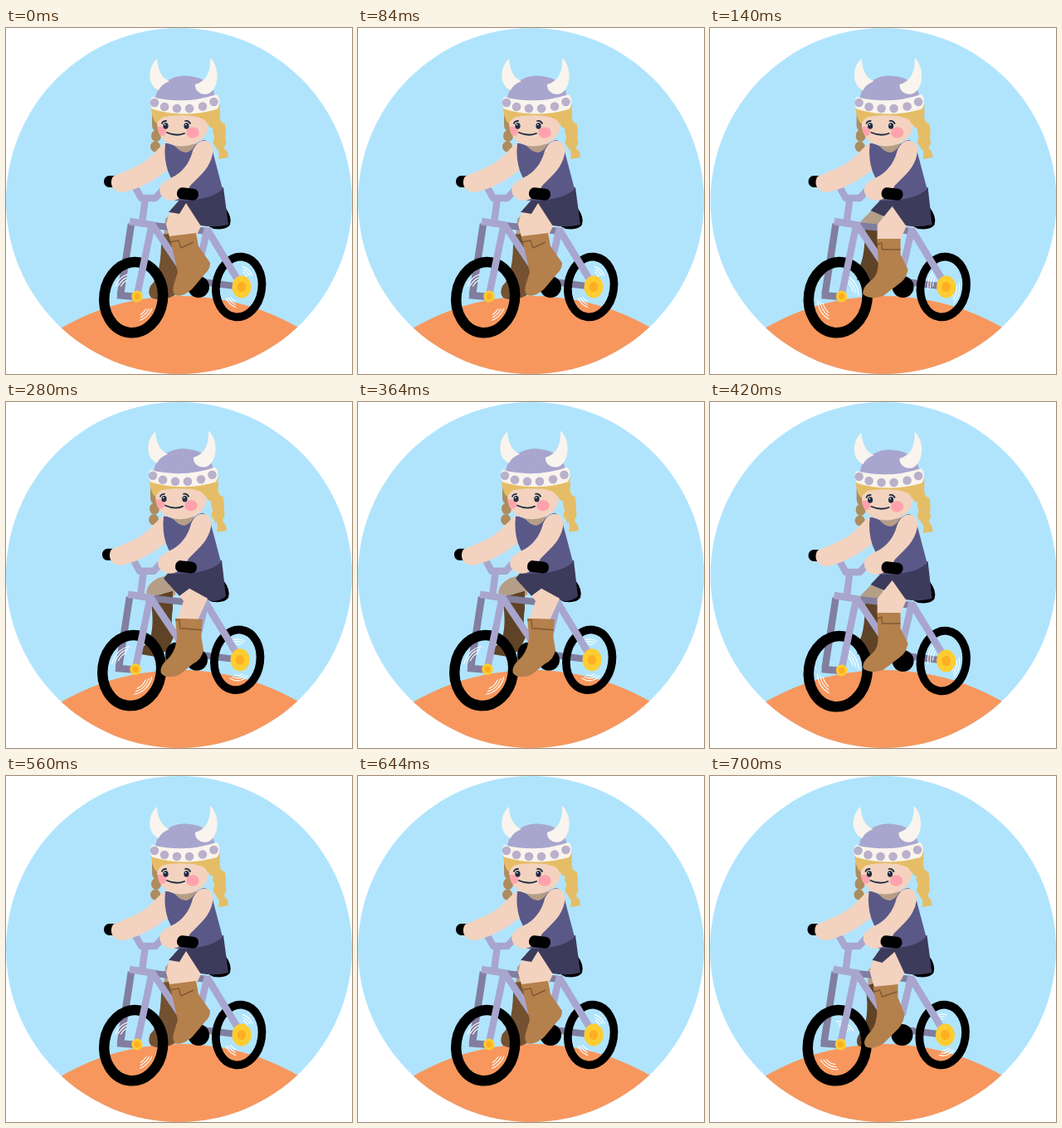
Animation, 417 px wide and 417 px high, one loop 0.84 s. Source, as an HTML page:

```html
<!DOCTYPE html>
<html lang="en">
<head>
<meta charset="utf-8">
<title>Viking cyclist</title>
<style>
html, body { margin: 0; width: 100%; height: 100%; overflow: hidden; background: #fff }
svg { display: block; width: 100vw; height: 100vh }
.skin { fill: #f3d3bf } .shade { fill: #b59e88 }
.boot { fill: #b4804c } .far { fill: #745130 } .deep { fill: #5f4327 }
.tunic { fill: #5a5887 } .shorts { fill: #3d3b5b }
.cream { fill: #f9f4ed } .metal { fill: #a8a6ce } .hair { fill: #e5bd66 } .darkhair { fill: #ad8c5d }
.gold { fill: #ffcc31 } .amber { fill: #fdae22 } .pink { fill: #ffa2ad }
.tube { fill: none; stroke: #a8a6ce; stroke-width: 8.5; stroke-linejoin: round }
.dim { stroke: #817e9f }
.tyre { fill: none; stroke: #000 }
.shine path { fill: none; stroke: #fff; stroke-width: 1.1; stroke-linecap: round }
.ink { fill: none; stroke: #1d2d42; stroke-width: 1.8; stroke-linecap: round }
.fold { fill: none; stroke: #805932; stroke-width: 1.4 }
</style>
</head>
<body>
<svg viewBox="0 0 417 417">
  <clipPath id="disc"><circle id="edge" cx="208.5" cy="208.5" r="208.5"/></clipPath>
  <g clip-path="url(#disc)">
    <rect width="417" height="417" fill="#b0e4fd"/>
    <circle cx="210" cy="609" r="286" fill="#f7975d"/>
  </g>
  <g id="rider">
    <g id="farLeg"></g>
    <g class="tube">
      <path class="dim" d="M151 236L138 321"/>
      <path class="dim" d="M134 322L158 324"/>
      <path class="dim" d="M178 238L243 245M228 305L284 312" stroke-width="8"/>
    </g>
    <ellipse class="tyre" cx="280.7" cy="312" rx="27.6" ry="36.5" stroke-width="9.7" transform="rotate(8 280.7 312)"/>
    <ellipse class="tyre" cx="153.7" cy="324.7" rx="35.3" ry="42.7" stroke-width="12.5" transform="rotate(8 153.7 324.7)"/>
    <g id="shine" class="shine"></g>
    <ellipse cx="232" cy="312" rx="13" ry="13"/>
    <path d="M241 237L264 216Q273 228 270 237Q266 244 250 242Z"/>
    <g class="tube">
      <path d="M153 187L163 205H180L190 194M168 204L164 235"/>
      <path d="M149 233L180 238M176 236L158 322"/>
      <path d="M177 238L212 290M243 241L232 288M242 242L281 306"/>
    </g>
    <ellipse class="gold" cx="284" cy="312" rx="11.5" ry="13.5"/>
    <ellipse class="amber" cx="284" cy="312" rx="5.2" ry="6"/>
    <ellipse class="gold" cx="158" cy="323.5" rx="6.7" ry="7"/>
    <ellipse class="amber" cx="158" cy="323.5" rx="3.6" ry="3.8"/>
    <g id="nearLeg"></g>

    <g class="darkhair">
      <path d="M176 104L189 109L186 124Q176 126 176 117Z"/>
      <ellipse cx="181" cy="130" rx="6" ry="7"/><ellipse cx="180" cy="143" rx="6" ry="6.5"/>
    </g>
    <rect x="118" y="178" width="18" height="14" rx="6.5"/>
    <path class="skin" d="M193 137C181 146 174 158 162 164C149 171 136 176 129 179C124 187 128 198 141 198C158 195 179 184 196 170Z"/>
    <path class="tunic" d="M192 139Q200 138 207 145Q217 151 226 143Q233 135 240 135L247 141L261 194Q246 209 203 208L205 195L195 172Q190 157 192 139Z"/>
    <path class="shade" d="M202 139L229 136Q228 146 218 150Q209 151 202 139Z"/>
    <path class="skin" d="M232 138C241 132 252 139 249 152C246 168 235 177 222 190C218 198 211 207 201 208C190 208 183 200 186 191C188 186 196 182 204 178C217 170 223 157 225 148Q228 141 232 138Z"/>
    <rect x="206" y="193" width="26" height="14" rx="6.5" transform="rotate(6 219 200)"/>

    <g class="hair">
      <path d="M240 100L258 98L257 116Q250 121 244 115Z"/>
      <path d="M250 108L264 116L265 128L263 146L254 147L250 126Z"/>
      <ellipse cx="251" cy="113" rx="8" ry="8"/><ellipse cx="257" cy="124" rx="8" ry="7.5"/>
      <ellipse cx="257.5" cy="137" rx="8" ry="7.5"/>
      <path d="M258 142Q268 146 268 156L256 158Q258 149 255 145Z"/>
    </g>
    <path class="skin" d="M183 106C180 122 185 134 198 140C216 147 243 139 244 117L241 101L188 100Z"/>
    <path class="pink" d="M183 119Q191 118 193 124Q193 130 187 130Q183 127 183 119Z"/>
    <ellipse class="pink" cx="225" cy="126" rx="7.7" ry="6.8"/>
    <path class="hair" d="M175 94L258 92L256 110Q249 109 243 116Q240 108 225 106Q200 104 188 108L181 115Q175 108 175 94Z"/>
    <g fill="#1d2d42">
      <ellipse cx="192.5" cy="118" rx="3.1" ry="3.8"/><ellipse cx="217.5" cy="118" rx="3.1" ry="3.8"/>
    </g>
    <g fill="#fff"><circle cx="191.7" cy="116.6" r=".8"/><circle cx="216.7" cy="116.6" r=".8"/></g>
    <path class="ink" d="M188 115Q189 112 193 112M216 112Q220 111 222 115M194 126Q205 131 215 127"/>

    <path class="metal" d="M180 86C181 67 201 57 217 57.5C240 59 251 70 252 85L216 94Z"/>
    <path class="cream" d="M182 37C183 50 187 60 197 64Q187 68 184 75C169 68 171 46 182 37ZM246 36C257 45 258 70 246 78C238 83 227 77 228 68C240 65 247 54 246 36Z"/>
    <path class="cream" d="M176 83Q215 93 254 80C259 84 258 95 254 98Q215 109 177 98C173 95 173 87 176 83Z"/>
    <g id="studs" fill="#b9b0cb"></g>
  </g>
</svg>
<script>
const FRAME_MS = 140;
const ORDER = [0, 1, 2, 1, 0, 3];
const el = id => document.getElementById(id);
const shape = (cls, d) => `<path class="${cls}" d="${d}"/>`;

// Three nested highlights, centred on an angle in degrees.
function glint(cx, cy, rx, ry, angle, span) {
  return [0, 3, 6].map((inset, i) => {
    const at = side => {
      const a = (angle + side * span * (1 - i * .2) / 2) * Math.PI / 180;
      return [cx + (rx - inset) * Math.cos(a), cy + (ry - inset) * Math.sin(a)].map(v => v.toFixed(1));
    };
    return `<path d="M${at(-1)}A${rx - inset} ${ry - inset} 0 0 1 ${at(1)}"/>`;
  }).join('');
}
const shine = (front, rear, span) => [0, 180].map(turn =>
  glint(153.7, 324.7, 25, 29, front + turn, span) +
  glint(281, 312, 19, 25, rear + turn, span)).join('');

const poses = [
  {
    shift: [0, 0], disc: 0, shine: shine(50, 125, 44),
    far: shape('shade', 'M192 230L203 220L204 250L190 254Z') +
      shape('far', 'M187 249L205 247L210 318Q190 332 175 325Q170 320 174 311Q188 299 187 249Z'),
    near: shape('shorts', 'M211 205L262 192L268 237Q253 241 235 238L206 226L196 222Z') +
      shape('skin', 'M197 222L209 224L217 211L235 239L229 251L198 255L193 237Z') +
      shape('boot', 'M197 251L229 247L232 263L246 283Q246 291 240 296L224 315Q212 325 204 322Q199 318 203 307L207 294Z') +
      shape('fold', 'M198 258L208 256L211 265L226 258')
  },
  {
    shift: [.6, 0], disc: .6, shine: shine(145, 20, 58),
    far: shape('shade', 'M181 233L207 207L208 235L188 246Z') +
      shape('deep', 'M186 240L207 235L205 288L196 305L177 304L175 295Q187 282 186 240Z'),
    near: shape('shorts', 'M207 205L262 192L267 237Q250 241 235 238L193 220Z') +
      shape('skin', 'M219 215L236 239L228 257L201 256L201 237Z') +
      shape('boot', 'M201 254L229 254L229 273L238 291Q236 302 229 307L208 323Q192 328 184 321Q182 313 195 303Q203 296 202 281Z') +
      shape('fold', 'M201 261L206 259L207 267L229 267')
  },
  {
    shift: [-2, -1.2], disc: 0, shine: shine(50, 85, 68),
    far: shape('shade', 'M171 230Q173 220 184 214L206 207L206 234L176 243Z') +
      shape('deep', 'M176 237L203 229L203 250Q200 269 204 285L196 301L181 308L163 305Q164 298 174 290Q182 273 176 237Z') +
      '<ellipse cx="207" cy="306" rx="13" ry="15"/>',
    near: shape('shorts', 'M199 205L262 192L267 235Q261 242 249 241L236 236L211 235L192 214Z') +
      shape('skin', 'M211 235L223 226L245 238L233 264L208 264L216 241Z') +
      shape('boot', 'M206 262L239 263L237 282L240 300Q238 312 227 317L211 330Q195 336 189 328Q186 320 199 309Q208 298 208 282Z') +
      shape('fold', 'M206 264L211 264L212 274L238 276')
  },
  {
    shift: [-.5, 0], disc: 0, shine: shine(115, 75, 56),
    far: shape('shade', 'M191 234L204 220L206 250L191 256Z') +
      shape('deep', 'M188 253L207 247L209 317Q190 331 179 325Q175 319 181 310Q194 296 188 253Z'),
    near: shape('shorts', 'M208 205L262 192L268 237Q251 241 235 238L208 226L196 222Z') +
      shape('skin', 'M197 222L208 225L223 212L235 238L226 254L199 257L193 235Z') +
      shape('boot', 'M197 254L227 251L227 267L235 287Q234 297 228 304L210 322Q196 331 188 326Q183 319 195 307Q202 298 202 280Z') +
      shape('fold', 'M198 260L205 258L208 266L226 260')
  }
];

const studs = [[179, 90], [191, 95], [206, 97], [221, 97], [237, 94.5], [250.5, 89]];
el('studs').innerHTML = studs.map(([x, y]) => `<circle cx="${x}" cy="${y}" r="5.3"/>`).join('');

let shown;
function draw(now) {
  const pose = poses[ORDER[Math.floor(now / FRAME_MS) % ORDER.length]];
  if (pose !== shown) {
    el('rider').setAttribute('transform', `translate(${pose.shift})`);
    el('edge').setAttribute('cx', 208.5 + pose.disc);
    el('farLeg').innerHTML = pose.far;
    el('nearLeg').innerHTML = pose.near;
    el('shine').innerHTML = pose.shine;
    shown = pose;
  }
  requestAnimationFrame(draw);
}
draw(performance.now());
</script>
</body>
</html>
```
